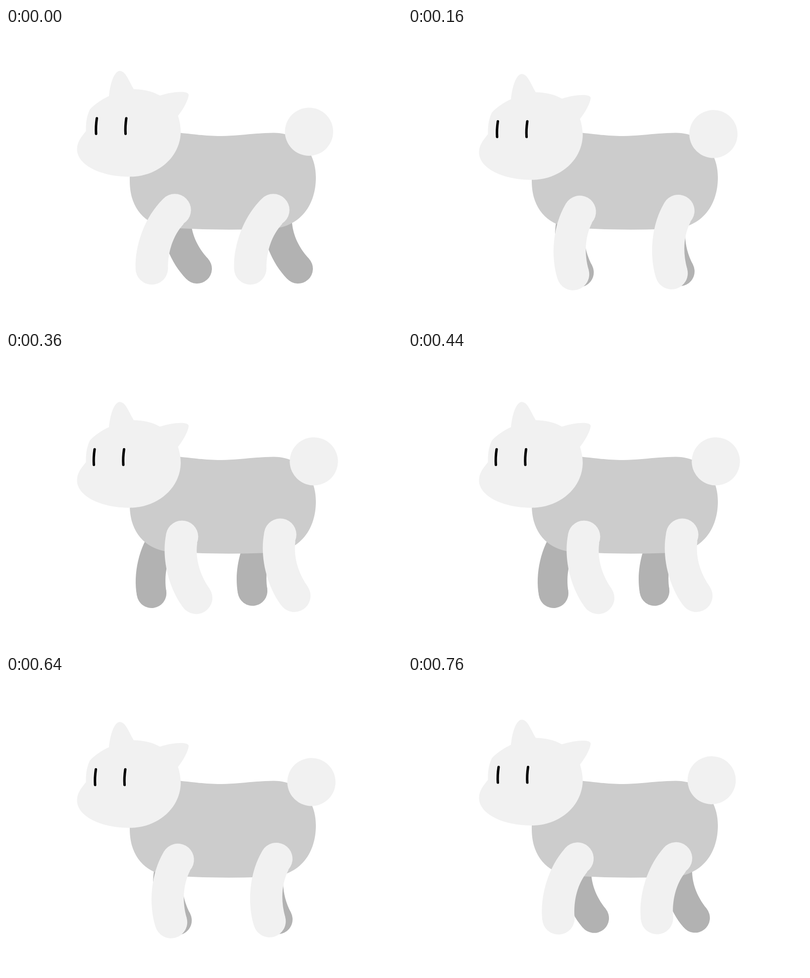
Animation, 800 px wide and 600 px high, one loop 800 ms. Source, as an HTML page:

```html
<!DOCTYPE html>
<html lang="en">
<head>
<meta charset="utf-8">
<title>Walking animal</title>
<style>
  html, body { margin: 0; width: 100%; height: 100%; overflow: hidden; background: #fff; }
  svg { display: block; width: 800px; height: 600px; }
  .light { fill: #f1f1f1; }
  .mid { fill: #ccc; }
  .dark { fill: #b2b2b2; }
  .eyes { fill: none; stroke: #000; stroke-width: 5; stroke-linecap: round; }
</style>
</head>
<body>
<svg viewBox="0 0 800 600">
  <defs>
    <g id="leg">
      <path d="M317 347C281 382 260 440 261.8 487.5L327.2 487.5C327 452 338 420 359 397L341 369Z"/>
      <circle cx="341" cy="369" r="32.7"/>
      <circle cx="294.5" cy="487.5" r="32.7"/>
    </g>
    <!-- smaller leg, foot at the origin, swung to its forward pose -->
    <g id="farLeg">
      <use href="#leg" transform="rotate(-42.5) scale(.917) translate(-294.5 -487.5)"/>
    </g>
  </defs>

  <g class="dark">
    <g id="farFront"><use href="#farLeg" x="386" y="488"/></g>
    <g id="farHind"><use href="#farLeg" x="590" y="488"/></g>
  </g>

  <path class="mid" d="M345 212C380 215 400 219 435 219C470 219 500 213 540 212.5
    C592 212 626 250 626 303C626 365 588 407 530 407Q440 411 350 406
    C292 408 250 375 250 310L250 240Z"/>

  <g class="light">
    <g id="tail"><circle cx="612.2" cy="210.2" r="48.7"/></g>
    <g id="nearFront"><use href="#leg"/></g>
    <g id="nearHind"><use href="#leg" x="199"/></g>
    <path id="head" d="M208 138C210 115 218 87 230 87C241 87 248 106 258 124
      C278 124 297 129 311 137C335 129 367 126 369 135C369 146 356 168 347.5 178
      C351 189 353 200 353 211C352 262 306 301.5 250 301.5
      C190 301.5 143.5 277 143.5 246C143.5 230 153 220 161.5 209
      C161 190 164 176 169.5 165C178 155 195 144 208 138Z"/>
  </g>
  <path id="eyes" class="eyes" d="M183.5 183Q181 200 182 214.5M243 183Q240.5 200 241.5 214.5"/>
</svg>
<script>
  const LOOP = 800, STEP = 40;

  // [id, total turn in degrees, pivot x, pivot y]
  const turns = [
    ["nearFront", -38.2, 357, 348],
    ["nearHind", -38.2, 549, 347],
    ["farFront", 38.2, 338.4, 340],
    ["farHind", 38.2, 549.6, 337.7],
    ["tail", 21.5, 583.3, 244.5]
  ];
  // [id, total dx, total dy]
  const shifts = [["head", 0, 15.8], ["eyes", -5, 15.8]];

  const set = (id, value) => document.getElementById(id).setAttribute("transform", value);

  function draw(now) {
    const t = Math.floor((now % LOOP) / STEP) * STEP;
    const k = 1 - Math.abs(1 - 2 * t / LOOP);
    for (const [id, angle, x, y] of turns) set(id, `rotate(${angle * k} ${x} ${y})`);
    for (const [id, dx, dy] of shifts) set(id, `translate(${dx * k} ${dy * k})`);
  }

  const start = performance.now();
  function tick() {
    draw(performance.now() - start);
    requestAnimationFrame(tick);
  }
  tick();
</script>
</body>
</html>
```
